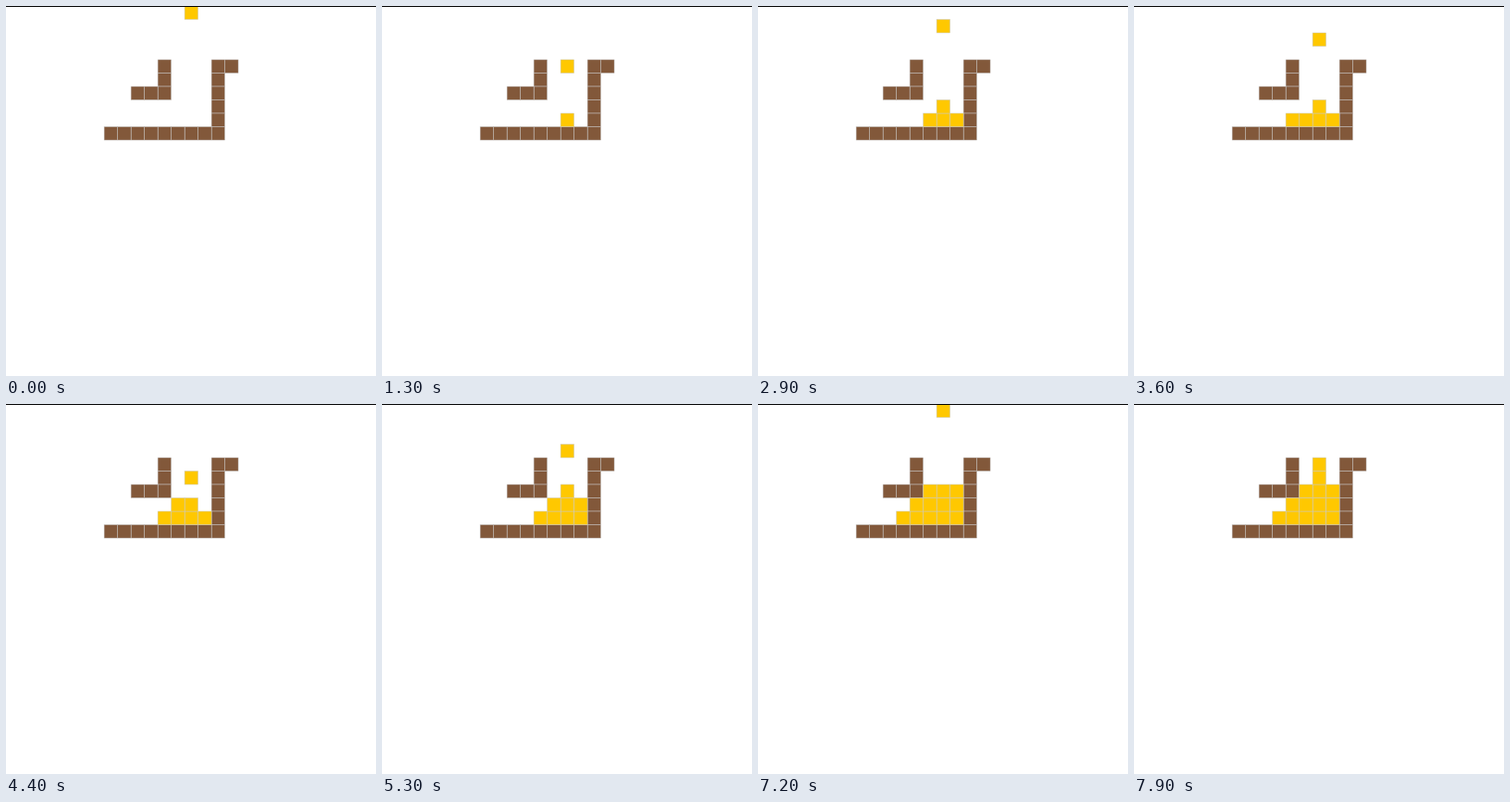
An HTML page with a canvas that plays this animation: 400x400 px, repeating every 8000 ms.

```html
<!DOCTYPE html>
<html>
<head>
<meta charset="utf-8">
<title>Falling sand</title>
<style>
html, body { margin: 0; width: 100%; height: 100%; overflow: hidden; background: #fff; }
canvas { display: block; }
</style>
</head>
<body>
<canvas id="stage" width="400" height="400"></canvas>
<script>
const ctx = document.getElementById('stage').getContext('2d');
const CELL = 14.5, LEFT = 193.1;
const LOOP = 8000, HOLD = 500, TICK = 100;
const ROCK = '#82583a', SAND = '#ffc800';

// Columns are counted from the one the sand drops through.
const walls = [
  [[-2, 4], [-2, 6], [-4, 6]],
  [[3, 4], [2, 4], [2, 9], [-6, 9]]
];

const key = (x, y) => x + ',' + y;
const rocks = new Map();
for (const wall of walls) {
  for (let i = 1; i < wall.length; i++) {
    let [x, y] = wall[i - 1];
    const [ex, ey] = wall[i];
    rocks.set(key(x, y), [x, y]);
    while (x !== ex || y !== ey) {
      x += Math.sign(ex - x);
      y += Math.sign(ey - y);
      rocks.set(key(x, y), [x, y]);
    }
  }
}

// One entry per simulation step: the moving grain and how many lie still.
const settled = [], steps = [];
const filled = new Set(rocks.keys());
while (settled.length < 15) {
  let x = 0, y = 0;
  for (;;) {
    steps.push({ grain: [x, y], still: settled.length });
    const dx = [0, -1, 1].find(d => !filled.has(key(x + d, y + 1)));
    if (dx === undefined) break;
    x += dx;
    y++;
  }
  filled.add(key(x, y));
  settled.push([x, y]);
}

function cell([x, y], color) {
  const px = LEFT + x * CELL, py = y * CELL;
  ctx.fillStyle = color;
  ctx.fillRect(px, py, CELL, CELL);
  ctx.strokeRect(px, py, CELL, CELL);
}

function draw(t) {
  const tick = t < HOLD ? 0 : 1 + Math.floor((t - HOLD) / TICK);
  // The simulation runs slightly faster than the picture refreshes.
  const { grain, still } = steps[Math.floor(tick * 1.442 + 0.165)];
  ctx.fillStyle = '#fff';
  ctx.fillRect(0, 0, 400, 400);
  ctx.strokeStyle = '#c8c8c8';
  ctx.lineWidth = 0.5;
  for (const r of rocks.values()) cell(r, ROCK);
  for (const s of settled.slice(0, still)) cell(s, SAND);
  cell(grain, SAND);
  ctx.fillStyle = '#000';
  ctx.fillRect(0, 0, 400, 1);
}

const start = performance.now();
function frame() {
  draw((performance.now() - start) % LOOP);
  requestAnimationFrame(frame);
}
frame();
</script>
</body>
</html>
```
